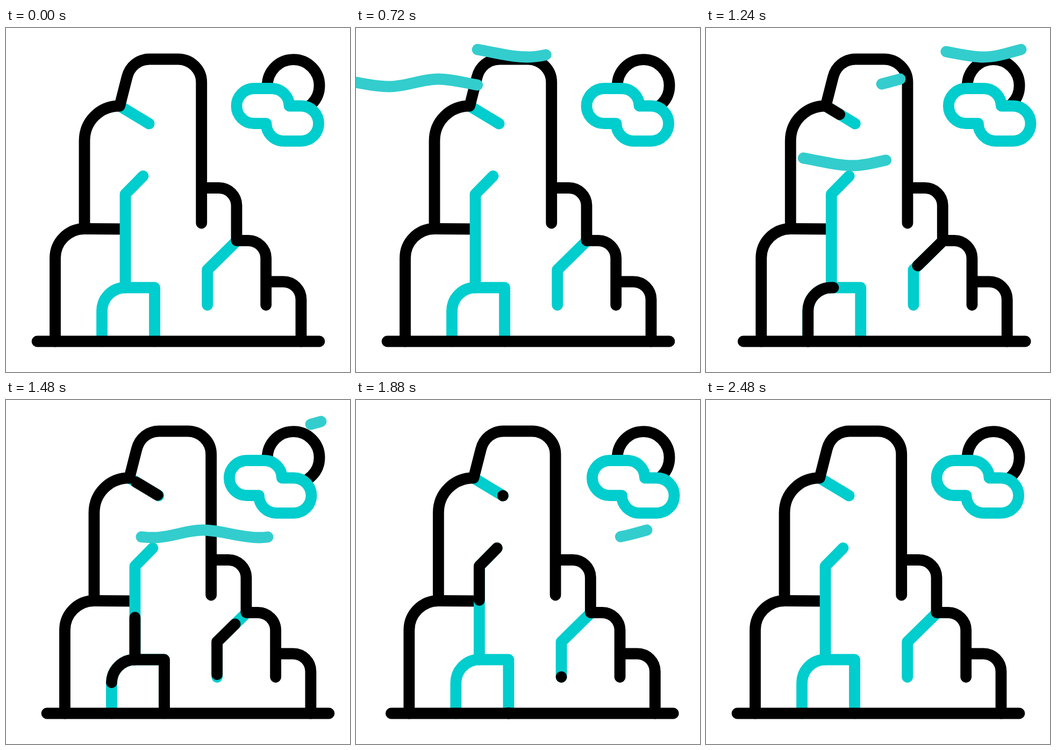
Recreate the animation shown at these times as an HTML page. Size 640 by 640 pixels, loop 3200 ms.

```html
<!DOCTYPE html>
<html lang="en">
<head>
<meta charset="utf-8">
<title>Windy cliff</title>
<style>
  html, body { margin: 0; width: 100%; height: 100%; overflow: hidden; background: #fff; }
  svg { display: block; width: 100vw; height: 100vh; }
  path, circle { fill: none; stroke: #000; stroke-width: 20.8; stroke-linecap: round; stroke-linejoin: round; }
  .cyan path { stroke: #00cdcd; }
  #winds path { stroke: #33cdcd; }
  #cloud { fill: #fff; stroke: #00cdcd; }
</style>
</head>
<body>
<svg viewBox="0 0 640 640">
  <circle cx="534.7" cy="107" r="48.4"/>
  <path id="cloud" d="M461.5 112.5H494.5A32.5 32.5 0 0 1 527 145H549A32.5 32.5 0 0 1 549 210.3H516.5A32.5 32.5 0 0 1 484 177.6H461.5A32.5 32.5 0 0 1 461.5 112.5Z"/>
  <g id="cliff">
    <path d="M91.5 583V428A54.5 54.5 0 0 1 146 373.5L215 374"/>
    <g id="cracks" class="cyan"></g>
    <path d="M146 372V210C146 173 175 145 211.5 145L225 92C230 71 247 58 267 58H320C344 58 363.7 77 363.7 101V363M363.7 297.5H396A33 33 0 0 1 429 330V395.5H451A33 33 0 0 1 483.7 428V515.5M483.7 472H516A33 33 0 0 1 549 505V583"/>
    <g id="sweeps"></g>
    <path d="M58 583H583"/>
  </g>
  <g id="winds"></g>
</svg>
<script>
const LOOP = 3200, STEP = 40;
const $ = id => document.getElementById(id);

function addPath(parent, d) {
  const p = document.createElementNS('http://www.w3.org/2000/svg', 'path');
  p.setAttribute('d', d);
  p.setAttribute('pathLength', 1);
  return parent.appendChild(p);
}

// Sine ease from 0 to 1 between two times
function ease(t, from, to) {
  const p = Math.min(1, Math.max(0, (t - from) / (to - from)));
  return (1 - Math.cos(Math.PI * p)) / 2;
}

// Eased value through [time, value] keys
function track(t, keys) {
  let v = keys[0][1];
  for (let i = 1; i < keys.length; i++)
    v += (keys[i][1] - keys[i - 1][1]) * ease(t, keys[i - 1][0], keys[i][0]);
  return v;
}

// Show only the part of a path from s to e
function trim(p, s, e) {
  p.style.display = e > 0 && s < 1 ? '' : 'none';
  p.style.strokeDasharray = `${Math.max(e - s, 0.0001)} 2`;
  p.style.strokeDashoffset = -s;
}

const cracks = [
  { d: 'M213 146L266 178', delay: 0 },
  { d: 'M222 483V309L255 275.5', delay: 280 },
  { d: 'M178.5 583V527A43.5 43.5 0 0 1 222 483H276.5V583', delay: 0 },
  { d: 'M429 396.5L374.7 450V515.5', delay: 0 }
];
for (const c of cracks) {
  addPath($('cracks'), c.d);
  c.sweep = addPath($('sweeps'), c.d);
}

const wave = 'M226 40C265 47 290 54 320 54C352 54 380 40 411 40C445 40 480 54 516 54C540 54 560 47 586 40';
const winds = [
  { delay: -195, x: -303.7, y: 55, speed: 0.0635 },
  { delay: 0, x: 0, y: 0, speed: 0 },
  { delay: 480, x: -45, y: 202, speed: 0 }
];
for (const w of winds) w.path = addPath($('winds'), wave);

const cliffKeys = [[880, 0], [1500, 18], [2180, 0]];
const cloudKeys = [[880, 0], [1200, 24], [1500, -14], [1830, 11], [2180, 0]];

function draw(t) {
  $('cliff').setAttribute('transform', `translate(${track(t, cliffKeys)})`);
  $('cloud').setAttribute('transform', `translate(${track(t, cloudKeys)})`);
  for (const { sweep, delay } of cracks) {
    const u = t - delay;
    trim(sweep, ease(u, 1300, 1900), ease(u, 960, 1550));
  }
  for (const { path, delay, x, y, speed } of winds) {
    const u = t - delay;
    trim(path, ease(u, 748, 1608), ease(u, 387, 1210));
    path.setAttribute('transform', `translate(${x + speed * t} ${y})`);
  }
}

const start = performance.now();
function frame() {
  const t = (performance.now() - start) % LOOP;
  draw(Math.floor(t / STEP) * STEP);
  requestAnimationFrame(frame);
}
frame();
</script>
</body>
</html>
```
